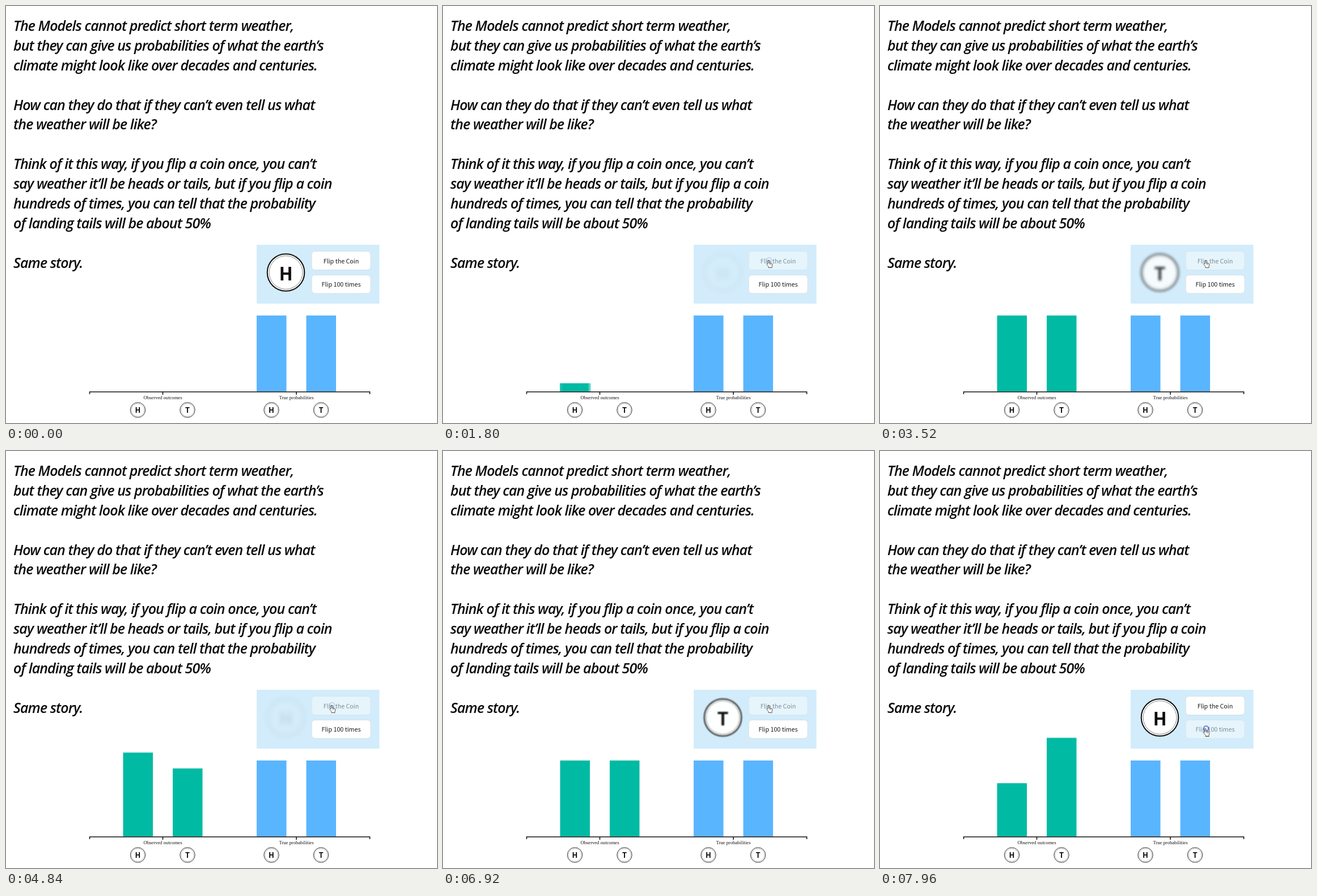
An HTML page that plays this animation: 760x737 px, repeating every 8000 ms.

```html
<!DOCTYPE html>
<html lang="en">
<head>
<meta charset="utf-8">
<title>Coin flips and probability</title>
<style>
  html, body { margin: 0; width: 100%; height: 100%; overflow: hidden; background: #fff; }
  svg { display: block; width: 760px; height: 737px; }

  .note { font: italic 600 25px "Open Sans", sans-serif; font-stretch: 75%; letter-spacing: -.9px; fill: #0c0c0c; }
  .label { font: 8.6px "Liberation Serif", serif; text-anchor: middle; fill: #111; }
  .ui { font: 10.7px "Noto Sans CJK SC", "Noto Sans CJK JP", sans-serif; text-anchor: middle; fill: #1a1a1a; }
  .face { font: 700 32px "Noto Sans CJK SC", "Noto Sans CJK JP", sans-serif; text-anchor: middle; fill: #0c0c0c; }
  .small .face { font-size: 13px; }
  .box { fill: #fff; stroke: #d9dee2; }
  .axis { fill: none; stroke: #151515; stroke-width: 1.6; }
  .rim { fill: #fff; stroke: #111; stroke-width: 2; }
  .inner { fill: none; stroke: #666; stroke-width: .8; }
  #disc .rim { stroke: #333; stroke-width: 1; }
  #disc .inner { stroke: #888; stroke-width: .5; }
  .true { fill: #5ab5ff; }
  .seen { fill: #00baa4; transform-origin: 0 681.5px; }

  /* One loop: 1% is 80 ms */
  .seen, .coin, .heads, .tails, .hand, .ring, .first, .second {
    animation: 8s linear infinite;
  }
  .seen { animation-timing-function: cubic-bezier(.65, 0, .35, 1); }
  .barH { animation-name: barH; }
  .barT { animation-name: barT; }
  .coin { animation-name: fade, blur; animation-timing-function: cubic-bezier(.5, 0, .3, 1), linear; }
  .heads { animation-name: heads; animation-timing-function: step-end; }
  .tails { animation-name: tails; animation-timing-function: step-end; }
  .hand { animation-name: hand; animation-timing-function: ease-in-out; }
  .ring { animation-name: ring; animation-timing-function: step-end; }
  .first { animation-name: first; }
  .second { animation-name: second; }

  @keyframes barH {
    0%, 21.95% { transform: scaleY(0); }
    24.45%, 41.06% { transform: scaleY(1); }
    43.56%, 59.44% { transform: scaleY(.5); }
    61.94%, 82.37% { transform: scaleY(.6667); }
    84.87%, 97.25% { transform: scaleY(.5); }
    99.4%, 100% { transform: scaleY(.351); }
  }
  @keyframes barT {
    0%, 41.06% { transform: scaleY(0); }
    43.56%, 59.44% { transform: scaleY(.5); }
    61.94%, 82.37% { transform: scaleY(.3333); }
    84.87%, 97.25% { transform: scaleY(.5); }
    99.4%, 100% { transform: scaleY(.649); }
  }
  @keyframes fade {
    0%, 17.96%, 26.71%, 37.12%, 45.87%, 55.5%, 64.25%, 78.5%, 87.25%, 100% { opacity: 1; }
    22.34%, 41.5%, 59.87%, 82.87% { opacity: .05; }
  }
  @keyframes blur {
    0%, 17.96%, 26.71%, 37.12%, 45.87%, 55.5%, 64.25%, 78.5%, 87.25%, 100% { filter: blur(0); }
    22.34%, 41.5%, 59.87%, 82.87% { filter: blur(5px); }
  }
  @keyframes heads {
    0%, 59.87%, 97.25% { opacity: 1; }
    41.5%, 82.87% { opacity: 0; }
  }
  @keyframes tails {
    0%, 59.87%, 97.25% { opacity: 0; }
    41.5%, 82.87% { opacity: 1; }
  }
  @keyframes hand {
    0%, .99% { transform: translate(590px, 540px); }
    1% { transform: translate(590px, 524px); }
    10.5%, 88.75% { transform: translate(575px, 449px); }
    96.25%, 100% { transform: translate(575px, 490.5px); }
  }
  @keyframes ring {
    0%, 23%, 43.5%, 61%, 84.5% { opacity: 0; }
    14.5%, 35%, 52.5%, 76%, 97% { opacity: 1; }
    15.5%, 36%, 53.5%, 77% { opacity: .25; }
  }
  @keyframes first {
    0%, 7% { opacity: 1; }
    8.5%, 92% { opacity: .45; }
    93.5%, 100% { opacity: 1; }
  }
  @keyframes second {
    0%, 4% { opacity: 1; }
    5%, 6.2% { opacity: .45; }
    7.5%, 93% { opacity: 1; }
    94.5%, 100% { opacity: .45; }
  }
</style>
</head>
<body>
<svg viewBox="0 0 760 737">
  <defs>
    <clipPath id="panel"><rect x="442" y="422" width="216.5" height="104"/></clipPath>
    <g id="disc">
      <circle class="rim" r="13.2"/>
      <circle class="inner" r="11.3"/>
    </g>
  </defs>

  <g class="note">
    <text x="13" y="44">The Models cannot predict short term weather,</text>
    <text x="13" y="79">but they can give us probabilities of what the earth’s</text>
    <text x="13" y="114">climate might look like over decades and centuries.</text>
    <text x="13" y="184">How can they do that if they can’t even tell us what</text>
    <text x="13" y="218">the weather will be like?</text>
    <text x="13" y="288">Think of it this way, if you flip a coin once, you can’t</text>
    <text x="13" y="323">say weather it’ll be heads or tails, but if you flip a coin</text>
    <text x="13" y="358">hundreds of times, you can tell that the probability</text>
    <text x="13" y="393">of landing tails will be about 50%</text>
    <text x="13" y="463">Same story.</text>
  </g>

  <rect class="seen barH" x="206.5" y="412.5" width="52.5" height="269"/>
  <rect class="seen barT" x="294" y="412.5" width="52.5" height="269"/>
  <rect class="true" x="442" y="547" width="52.5" height="134.5"/>
  <rect class="true" x="529.5" y="547" width="52.5" height="134.5"/>
  <path class="axis" d="M147.5 686V682H641.5V686M276.5 682V687M512 682V687"/>
  <text class="label" x="276.5" y="695">Observed outcomes</text>
  <text class="label" x="512" y="695">True probabilities</text>

  <g class="small">
    <g transform="translate(232.5 714)"><use href="#disc"/><text class="face" y="4.8">H</text></g>
    <g transform="translate(320 714)"><use href="#disc"/><text class="face" y="4.8">T</text></g>
    <g transform="translate(468 714)"><use href="#disc"/><text class="face" y="4.8">H</text></g>
    <g transform="translate(555.5 714)"><use href="#disc"/><text class="face" y="4.8">T</text></g>
  </g>

  <g clip-path="url(#panel)">
    <rect x="442" y="422" width="216.5" height="104" fill="#d2ecfb"/>
    <g class="coin">
      <circle class="rim" cx="493.5" cy="471" r="32.8"/>
      <circle class="inner" cx="493.5" cy="471" r="29.5"/>
      <text class="face heads" x="493.5" y="485">H</text>
      <text class="face tails" x="493.5" y="485">T</text>
    </g>
    <g class="first">
      <rect class="box" x="539" y="433.5" width="104" height="33" rx="6"/>
      <text class="ui" x="591" y="454.5">Flip the Coin</text>
    </g>
    <g class="second">
      <rect class="box" x="539" y="475.5" width="104" height="32.5" rx="6"/>
      <text class="ui" x="591" y="496">Flip 100 times</text>
    </g>
    <g class="hand">
      <circle class="ring" r="4.3" fill="none" stroke="#5566cc" stroke-width="1.8"/>
      <path d="M-2 7V1Q-1 -1 0 1V5L4.5 6Q6 6.5 6 8L5 11V13.5H-1V11.5L-4.5 7.5Q-4 5.5 -2 7Z"
            fill="#fff" stroke="#444" stroke-width=".9" stroke-linejoin="round"/>
      <path d="M1.3 6V8.5M3.3 6.5V8.5" stroke="#444" stroke-width=".7"/>
    </g>
  </g>
</svg>
</body>
</html>
```
